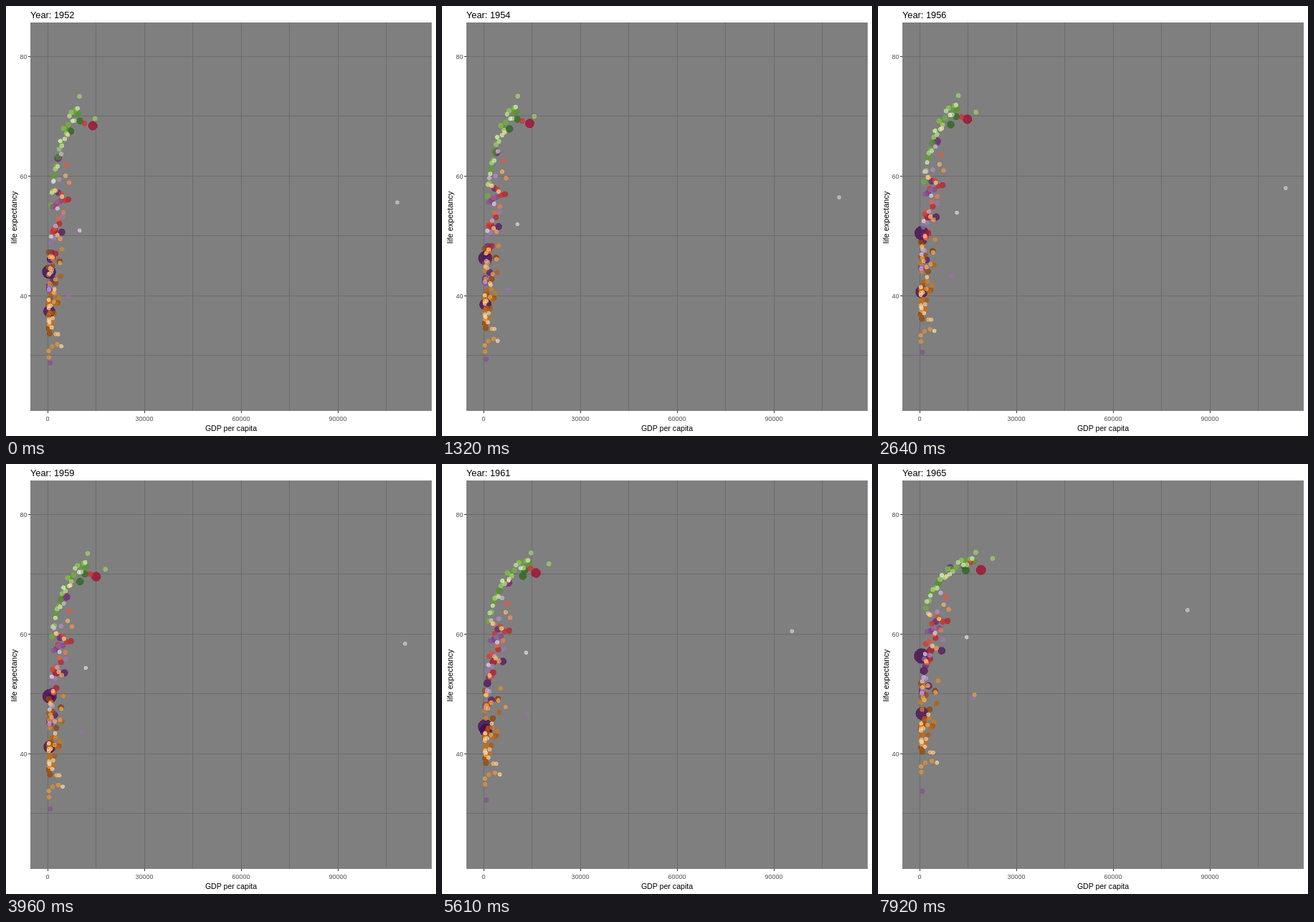
Animation of 600x600 px, one loop 8000 ms. Source, as an HTML page:

```html
<!DOCTYPE html>
<html lang="en">
<head>
<meta charset="utf-8">
<title>Life expectancy and GDP</title>
<style>
  html, body { margin: 0; width: 100%; height: 100%; overflow: hidden; background: #fff; }
  svg { display: block; width: 100vw; height: 100vh; }
  text { font-family: "Liberation Sans", Arial, sans-serif; }
  line, circle { shape-rendering: crispEdges; }
</style>
</head>
<body>
<svg id="chart" viewBox="0 0 600 600"></svg>
<script>
const LOOP = 8000, STEP = 330, LAST = 24, KEY_STEPS = 9, LEGS = 3;
const svg = document.getElementById('chart');
const px = gdp => 58.2 + 4.5 * gdp;
const py = life => 404.3 - 8.35 * (life - 40);
const lerp = (a, b, t) => a + (b - a) * t;

function add(tag, attrs, text) {
  const el = document.createElementNS('http://www.w3.org/2000/svg', tag);
  for (const k in attrs) el.setAttribute(k, attrs[k]);
  if (text) el.textContent = text;
  return svg.appendChild(el);
}

let seed = 7;
function rand() {
  seed = (seed * 16807) % 2147483647;
  return seed / 2147483647;
}

function ramp(stops, t) {
  const pos = t * (stops.length - 1), i = Math.min(Math.floor(pos), stops.length - 2);
  const mix = [1, 3, 5].map(c => {
    const [a, b] = [stops[i], stops[i + 1]].map(s => parseInt(s.slice(c, c + 2), 16));
    return Math.round(lerp(a, b, pos - i));
  });
  return `rgb(${mix})`;
}

// A country that stands out, moving through [GDP in thousands, life expectancy].
function landmark(color, pop, ...path) {
  const at = k => {
    const pos = k / LEGS * (path.length - 1), i = Math.min(Math.floor(pos), path.length - 2);
    return path[i].map((v, j) => lerp(v, path[i + 1][j], pos - i));
  };
  return { color, pop, at };
}

// A cloud around life = base + slope * ln(gdp). Per five years GDP grows
// by a factor and life expectancy keeps a share of its gap to the top.
function cloud({ n, stops, pop, decay, gdp, skew, base, slope, spread, growth, top, keep }) {
  return Array.from({ length: n }, (_, i) => {
    const g = lerp(...gdp, ((i + 0.5) * 0.618 % 1) ** skew);
    const life = base + slope * Math.log(g) + spread * (rand() + rand() - 1);
    return {
      color: ramp(stops, i / (n - 1)),
      pop: pop * Math.exp(-decay * i),
      at: k => [g * growth ** k, top - (top - life) * keep ** k]
    };
  });
}

const countries = [
  landmark('#40004b', 556, [0.4, 44], [0.6, 50.5], [0.5, 44.5], [0.6, 58.4]),
  landmark('#460552', 372, [0.5, 37.4], [0.8, 47.2]),
  landmark('#a50026', 157, [14, 68.4], [14.8, 69.5], [16.2, 70.2], [19.5, 70.8]),
  landmark('#6c2078', 86, [3.2, 63], [9.8, 71.4]),
  landmark('#276419', 69, [7.1, 67.5], [14.7, 70.8]),
  landmark('#2c6d1a', 50, [10, 69.2], [14.1, 71.4]),
  landmark('#ac0e26', 56, [2.1, 50.9], [3.4, 57.6]),
  landmark('#d73027', 15, [11.4, 68.8], [16.1, 72.1]),
  landmark('#dcc6e0', 0.2, [108.4, 55.6], [113.5, 58], [95.5, 60.5], [80.9, 64.6]),
  landmark('#e7d4e8', 0.1, [9.9, 50.9], [14.8, 59.9]),
  landmark('#9970ab', 4, [6.5, 39.9], [16.9, 49.9]),
  landmark('#f0a04a', 1, [2.4, 42.7], [3.4, 45.3], [6.8, 47.8], [18.8, 50.2]),
  landmark('#9fd066', 5, [14.7, 69.6], [23, 72.8]),
  landmark('#85508f', 8, [0.8, 28.8], [0.8, 34]),
  ...cloud({ // Europe
    n: 27, stops: ['#4d9221', '#7fbc41', '#b8e186', '#e6f5d0'], pop: 40, decay: 0.14,
    gdp: [1, 10.3], skew: 1.2, base: 54.5, slope: 7.5, spread: 2, growth: 1.22, top: 74, keep: 0.79
  }),
  ...cloud({ // Americas
    n: 23, stops: ['#b81528', '#d73027', '#f46d43', '#fdae61', '#fee090'], pop: 28, decay: 0.16,
    gdp: [1.4, 7], skew: 1.5, base: 42.5, slope: 9, spread: 10, growth: 1.11, top: 76, keep: 0.88
  }),
  ...cloud({ // Asia
    n: 27, stops: ['#4c0a59', '#762a83', '#9970ab', '#c2a5cf', '#e7d4e8'], pop: 70, decay: 0.17,
    gdp: [0.4, 5], skew: 2, base: 47, slope: 7, spread: 9, growth: 1.17, top: 76, keep: 0.9
  }),
  ...cloud({ // Africa
    n: 51, stops: ['#7f3b08', '#b35806', '#e08214', '#fdb863', '#fee0b6'], pop: 30, decay: 0.09,
    gdp: [0.3, 4.5], skew: 2.8, base: 39.3, slope: 1.5, spread: 10, growth: 1.09, top: 76, keep: 0.942
  })
].sort((a, b) => b.pop - a.pop);

function line(x1, y1, x2, y2, stroke) {
  add('line', { x1, y1, x2, y2, stroke });
}

function drawAxes() {
  add('rect', { width: 600, height: 600, fill: '#fff' });
  add('rect', { x: 34, y: 23, width: 560, height: 542, fill: '#7f7f7f' });
  for (let i = 0; i < 8; i++) {
    const x = Math.floor(px(15 * i)) + 0.5;
    line(x, 23, x, 565, '#6b6b6b');
    if (i % 2 === 0) {
      line(x, 565, x, 568, '#333');
      add('text', { x: x - 0.5, y: 579, 'font-size': 9, fill: '#4d4d4d', 'text-anchor': 'middle' }, String(i * 15000));
    }
  }
  for (let life = 80; life >= 30; life -= 10) {
    const y = Math.floor(py(life)) + 0.5;
    line(34, y, 594, y, '#6b6b6b');
    if (life % 20 === 0) {
      line(31, y, 34, y, '#333');
      add('text', { x: 29.5, y: y + 3.5, 'font-size': 9, fill: '#4d4d4d', 'text-anchor': 'end' }, String(life));
    }
  }
  add('text', { x: 314, y: 593, 'font-size': 10.6, 'text-anchor': 'middle' }, 'GDP per capita');
  add('text', { transform: 'translate(15 295) rotate(-90)', 'font-size': 11, 'text-anchor': 'middle' }, 'life expectancy');
}

drawAxes();
const title = add('text', { x: 34, y: 17, 'font-size': 12.8 });
for (const c of countries) {
  c.dot = add('circle', { fill: c.color, stroke: c.color, 'stroke-width': 0.7, 'fill-opacity': 0.7, 'stroke-opacity': 0.7 });
}

const cubicInOut = p => p < 0.5 ? 4 * p ** 3 : 1 - 4 * (1 - p) ** 3;

function render(ms) {
  const step = Math.min(LAST, Math.floor((ms % LOOP) / STEP));
  const leg = Math.floor(step / KEY_STEPS);
  const k = leg + cubicInOut(step / KEY_STEPS - leg);
  title.textContent = 'Year: ' + Math.round(1952 + step * 5 / KEY_STEPS);
  for (const c of countries) {
    const [gdp, life] = c.at(k);
    c.dot.setAttribute('cx', px(gdp).toFixed(2));
    c.dot.setAttribute('cy', py(life).toFixed(2));
    c.dot.setAttribute('r', (2.4 + 10.67 * Math.sqrt(c.pop * 1.1 ** k / 1318)).toFixed(2));
  }
}

const start = performance.now();
function tick() {
  render(performance.now() - start);
  requestAnimationFrame(tick);
}
tick();
</script>
</body>
</html>
```
